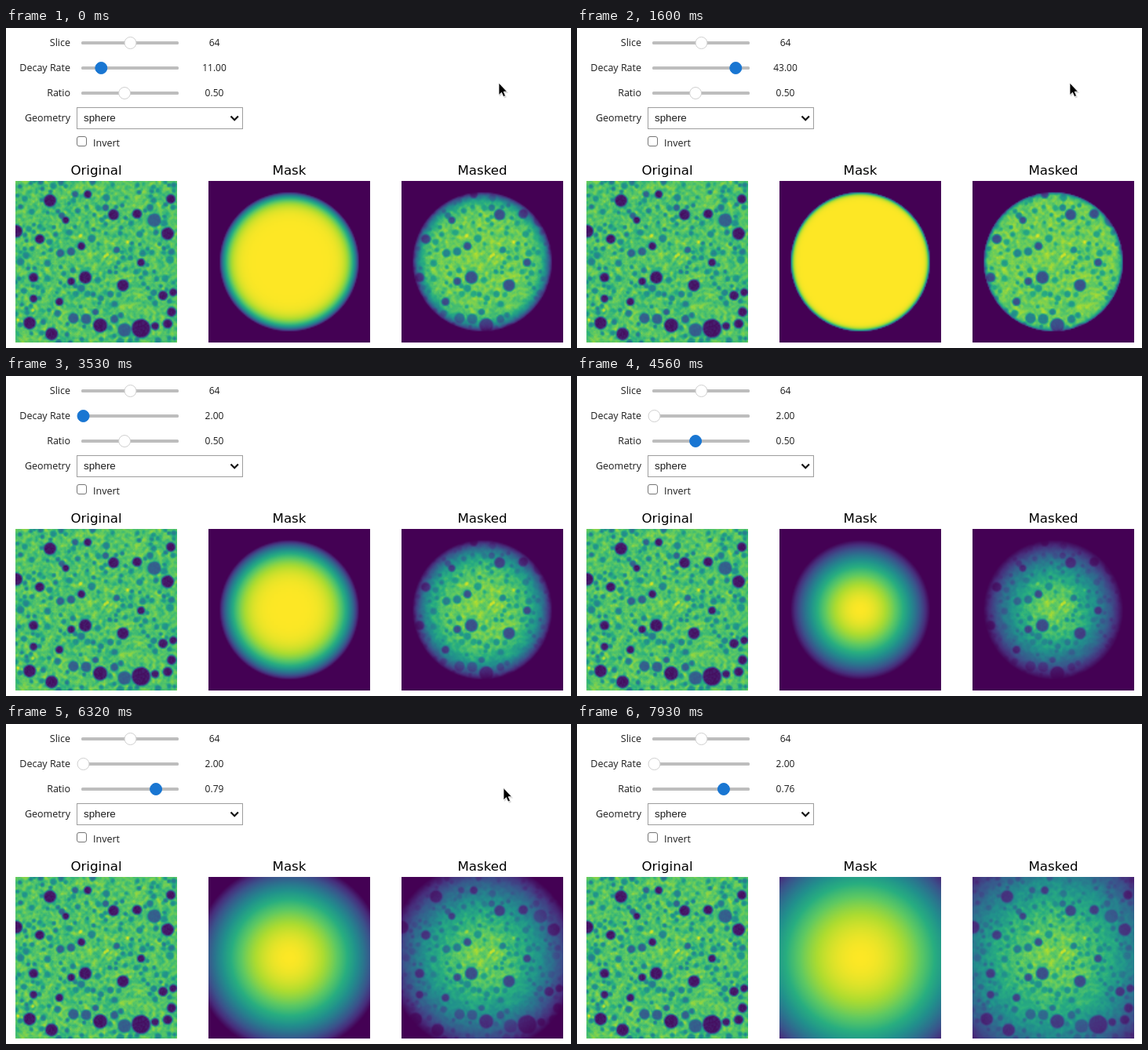
An HTML page with a canvas for the animation above (8000 ms loop, 720 px wide and 408 px high).

```html
<!DOCTYPE html>
<html lang="en">
<head>
<meta charset="utf-8">
<title>Mask explorer</title>
<style>
  html, body { margin: 0; width: 100%; height: 100%; overflow: hidden; background: #fff; }
  svg { position: absolute; left: 0; top: 0; }
  canvas { position: absolute; top: 195px; width: 206px; height: 206px; }
  .ui { font: 12.5px "Open Sans", "Noto Sans", sans-serif; fill: #1c1c1c; }
  .label { text-anchor: end; }
  .value { font-size: 12px; text-anchor: middle; }
  .title { font: 16.67px "DejaVu Sans", sans-serif; text-anchor: middle; fill: #000; }
  .option { font: 13.33px "Liberation Sans", Arial, sans-serif; fill: #1c1c1c; }
  .track { fill: #bdbdbd; }
  .thumb { fill: #fff; stroke: #cfcfcf; }
</style>
</head>
<body>
<canvas id="raw" width="128" height="128" style="left:12px"></canvas>
<canvas id="mask" width="128" height="128" style="left:258px"></canvas>
<canvas id="masked" width="128" height="128" style="left:504px"></canvas>

<svg width="720" height="408" viewBox="0 0 720 408">
  <g class="ui">
    <text class="label" x="82" y="23">Slice</text>
    <text class="label" x="82" y="55">Decay Rate</text>
    <text class="label" x="82" y="87">Ratio</text>
    <text class="label" x="82" y="119">Geometry</text>
    <text x="111" y="151">Invert</text>
    <text class="value" x="265.5" y="23">64</text>
    <text class="value" x="265.5" y="55" id="decayText">11.00</text>
    <text class="value" x="265.5" y="87" id="ratioText">0.50</text>
  </g>
  <g class="track">
    <rect x="96" y="17" width="124" height="4" rx="1.5"/>
    <rect x="96" y="49" width="124" height="4" rx="1.5"/>
    <rect x="96" y="81" width="124" height="4" rx="1.5"/>
  </g>
  <circle class="thumb" cx="158.5" cy="19" r="7.5"/>
  <circle class="thumb" id="decayThumb" cy="51" r="7.5"/>
  <circle class="thumb" id="ratioThumb" cy="83" r="7.5"/>

  <rect x="90.5" y="101.500" width="211" height="27" fill="#fff" stroke="#9e9e9e"/>
  <text class="option" x="99" y="119">sphere</text>
  <path d="M286.500 112.500l4.700 4.700 4.700-4.700" fill="none" stroke="#111" stroke-width="2.200"/>
  <rect x="90.5" y="138.500" width="12" height="12" rx="2.500" fill="#fff" stroke="#767676"/>

  <text class="title" x="115" y="187">Original</text>
  <text class="title" x="361" y="187">Mask</text>
  <text class="title" x="607" y="187">Masked</text>

  <g id="cursor">
    <path d="M1 2v15.500l3.600-3.300 2.400 5.300 3-1.300-2.400-5.200h4.700z" fill="#000" opacity=".15"/>
    <path d="M0 0v15.500l3.500-3.300 2.300 5.400 2.700-1.200-2.300-5.200h4.400z" fill="#000" stroke="#fff" stroke-width=".8"/>
  </g>
</svg>

<script>
const LOOP = 8000, STEP = 80.2, SIZE = 128, SCALE = SIZE / 206;
const $ = id => document.getElementById(id);
const clamp = (x, lo = 0, hi = 1) => Math.min(hi, Math.max(lo, x));
const mix = (a, b, k) => a + (b - a) * k;

// Slider keys: [step, value]
const DECAY = [[-3, 10], [0, 11], [5, 11], [12, 27], [16, 38.5], [20, 43], [21, 43],
  [23, 44], [27, 44], [32, 29], [38, 11.5], [42, 2]];
const RATIO = [[59, .5], [63, .515], [68, .515], [70, .52], [74, .65], [79, .79],
  [84, .93], [85, .93], [89, .97], [93, .97], [99, .76]];

function valueAt(keys, n) {
  if (n <= keys[0][0]) return keys[0][1];
  for (let i = 1; i < keys.length; i++) {
    const [n0, v0] = keys[i - 1], [n1, v1] = keys[i];
    if (n <= n1) return mix(v0, v1, (n - n0) / (n1 - n0));
  }
  return keys[keys.length - 1][1];
}

const rgb = hex => [1, 3, 5].map(i => parseInt(hex.slice(i, i + 2), 16));
const VIRIDIS = ['#440154', '#472d7b', '#3b528b', '#2c728e', '#21918c',
  '#28ae80', '#5ec962', '#addc30', '#fde725'].map(rgb);

function paint(id, field) {
  const ctx = $(id).getContext('2d');
  const img = ctx.createImageData(SIZE, SIZE);
  for (let i = 0; i < SIZE * SIZE; i++) {
    const p = clamp(field(i)) * 8, j = Math.min(7, Math.floor(p));
    for (let c = 0; c < 3; c++) img.data[i * 4 + c] = mix(VIRIDIS[j][c], VIRIDIS[j + 1][c], p - j);
    img.data[i * 4 + 3] = 255;
  }
  ctx.putImageData(img, 0, 0);
}

// Pores: [x, y, radius] in panel pixels
const DARK = [[44, 25, 8], [92, 17, 5], [125, 43, 7], [155, 42, 6], [194, 67, 8],
  [1, 64, 8], [198, 23, 6], [64, 50, 4.5], [31, 74, 6], [84, 83, 5], [160, 104, 5],
  [89, 123, 8], [71, 128, 5], [137, 133, 7.5], [23, 123, 6], [23, 150, 5], [56, 154, 5],
  [18, 181, 8], [46, 195, 8], [108, 184, 9], [160, 188, 12], [188, 146, 6], [201, 142, 5],
  [199, 167, 6], [194, 182, 6], [178, 185, 5]];
const SOFT = [[177, 50, 8.5], [139, 190, 8.5], [90, 176, 6.5], [74, 175, 6.5], [126, 176, 5],
  [102, 167, 4], [71, 90, 5], [57, 92, 5], [59, 44, 4], [76, 17, 4], [115, 34, 4], [129, 88, 4]];
const SPECKS = [[114, 96], [22, 165], [3, 177], [83, 70], [117, 94], [143, 78]];

function makeSlice() {
  let seed = 64;
  const rand = () => {
    seed = seed + 0x6D2B79F5 | 0;
    let t = Math.imul(seed ^ seed >>> 15, 1 | seed);
    t ^= t + Math.imul(t ^ t >>> 7, 61 | t);
    return ((t ^ t >>> 14) >>> 0) / 4294967296;
  };
  const noise = Array.from({ length: SIZE * SIZE }, rand);
  const field = noise.map((v, i) => {
    let sum = 0;
    for (let dy = -1; dy < 2; dy++)
      for (let dx = -1; dx < 2; dx++)
        sum += noise[(i + dy * SIZE + dx + SIZE * SIZE) % (SIZE * SIZE)];
    return .725 + (sum / 9 - .5) * .4 + (v - .5) * .05;
  });
  const dab = (x, y, r, level, edge) => {
    x *= SCALE; y *= SCALE; r *= SCALE;
    const reach = r + edge;
    for (let py = Math.max(0, Math.floor(y - reach)); py < Math.min(SIZE, y + reach); py++)
      for (let px = Math.max(0, Math.floor(x - reach)); px < Math.min(SIZE, x + reach); px++) {
        const a = clamp((r - Math.hypot(px + .5 - x, py + .5 - y)) / edge + .5);
        const i = py * SIZE + px, v = level + (noise[i] - .5) * .06;
        if (level > .8 || v < field[i]) field[i] = mix(field[i], v, a * a * (3 - 2 * a));
      }
  };
  const placed = [...DARK, ...SOFT];
  for (let tries = 0; tries < 700 && placed.length < 210; tries++) {
    const p = [rand() * 206, rand() * 206, 2.2 + rand() * rand() * 3];
    if (placed.some(q => Math.hypot(p[0] - q[0], p[1] - q[1]) < p[2] + q[2])) continue;
    placed.push(p);
    dab(...p, .38 + rand() * .14, 2.2);
  }
  SOFT.forEach(p => dab(...p, .3, 2));
  DARK.forEach(p => dab(...p, .06, 2.2));
  SPECKS.forEach(([x, y]) => dab(x, y, 2, .95, 1.5));
  return field;
}

const slice = makeSlice();
paint('raw', i => slice[i]);

function paintMasks(decay, ratio) {
  const radius = ratio * Math.sqrt(3) * SIZE / 2, mid = (SIZE - 1) / 2;
  const weight = i => {
    const d = Math.hypot(i % SIZE - mid, Math.floor(i / SIZE) - mid) / radius;
    return d < 1 ? 1 - d ** decay : 0;
  };
  paint('mask', weight);
  paint('masked', i => (.2 + .8 * slice[i]) * weight(i));
}

function setThumb(id, x, blue) {
  const shade = (from, to) => `rgb(${from.map((v, i) => Math.round(mix(v, to[i], blue)))})`;
  const el = $(id), accent = [25, 118, 210];
  el.setAttribute('cx', x);
  el.style.fill = shade([255, 255, 255], accent);
  el.style.stroke = shade([207, 207, 207], accent);
}

let lastStep = -1, lastDrawn = null;

function render(n) {
  const decay = Math.round(valueAt(DECAY, n));
  const ratio = Math.round(valueAt(RATIO, n) * 100) / 100;
  const focus = clamp((n - 54) / 3);
  $('decayText').textContent = decay.toFixed(2);
  $('ratioText').textContent = ratio.toFixed(2);
  setThumb('decayThumb', 96 + (decay - 1) * 124 / 49, 1 - focus);
  setThumb('ratioThumb', 96 + (ratio - .1) * 124 / .9, focus);

  const late = n >= 60;
  $('cursor').setAttribute('transform', late ? 'translate(634 81.500)' : 'translate(628 70)');
  $('cursor').style.display = n < 28 || late && n < 94 ? '' : 'none';

  // The plots refresh every third step and trail the sliders by three
  const phase = n < 6 || late ? 0 : 2;
  const drawn = Math.floor((n - phase) / 3) * 3 + phase - 3;
  if (drawn !== lastDrawn) {
    lastDrawn = drawn;
    paintMasks(valueAt(DECAY, drawn), valueAt(RATIO, drawn));
  }
}

const start = performance.now();
function tick() {
  const n = Math.floor(((performance.now() - start) % LOOP + 25) / STEP);
  if (n !== lastStep) render(lastStep = n);
  requestAnimationFrame(tick);
}
tick();
</script>
</body>
</html>
```
